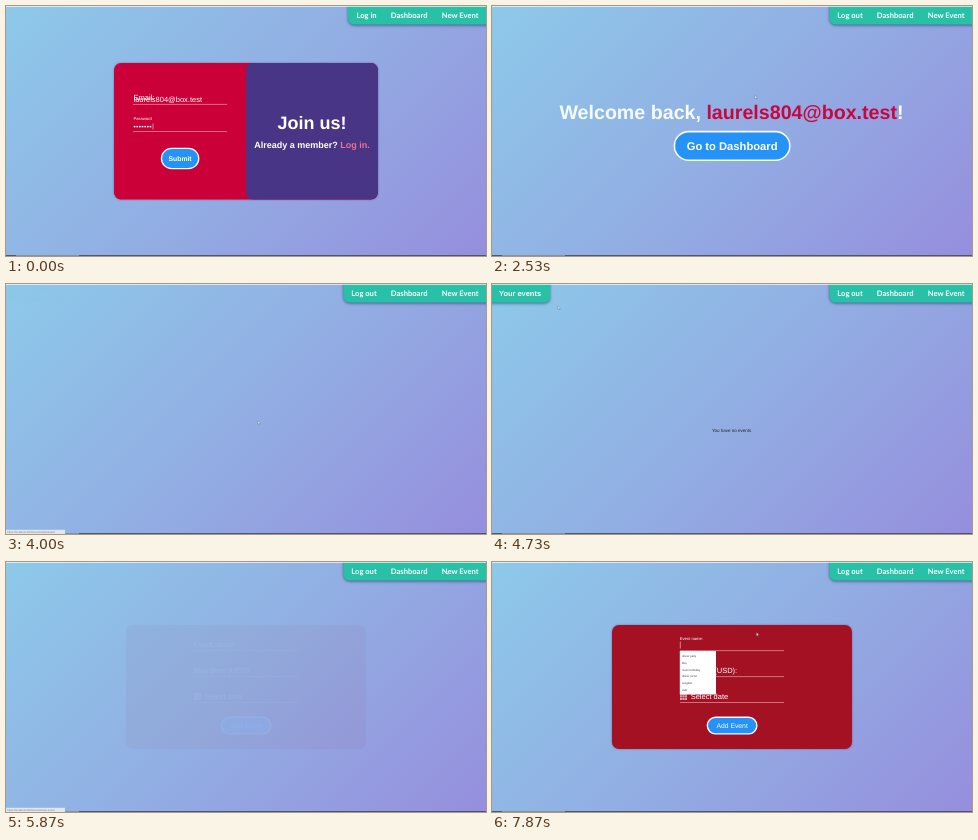
Animation of 480x250 px, one loop 8 s. Source, as an HTML page:

```html
<!DOCTYPE html>
<html lang="en">
<head>
<meta charset="utf-8">
<title>Event planner</title>
<style>
html, body { margin: 0; width: 100%; height: 100%; overflow: hidden; }
svg {
  display: block; width: 100vw; height: 100vh;
  background: linear-gradient(135deg, #8dc9e9 0%, #92ade3 52%, #968edd 100%);
  font-family: "Liberation Sans", Arial, sans-serif;
  text-rendering: geometricPrecision;
  fill: #fff;
}
.bold { font-weight: 700; }
.mid { text-anchor: middle; }
.nav { font: 700 7.6px Lato, sans-serif; }
.field { font-size: 7.5px; }
.small { font-size: 4.2px; }
.tab { fill: #28c0a7; filter: drop-shadow(0 1px 1.5px rgba(20, 40, 80, .6)); }
.card { filter: drop-shadow(0 .5px 1px rgba(40, 30, 90, .4)); }
.line { stroke: #fff; stroke-opacity: .6; stroke-width: .7; }
.caret { stroke: #fff; stroke-width: .5; }
</style>
</head>
<body>
<svg viewBox="0 0 480 250" preserveAspectRatio="none">
  <g id="login">
    <rect class="card" x="108" y="57" width="264" height="136.5" rx="7" fill="#cb0039"/>
    <rect x="240" y="57" width="132" height="136.5" rx="7" fill="#483586"/>
    <text class="field" x="127.5" y="93.7">Email:</text>
    <text class="field" x="127.5" y="95.5">laurels804@box.test</text>
    <path class="line" d="M127 98.4H221M127 125.5H221"/>
    <text class="small" x="127.5" y="114">Password</text>
    <g id="dots"></g>
    <path id="passCaret" class="caret" d="M147 117.5V123.5"/>
    <text class="bold mid" x="306" y="122.5" font-size="18">Join us!</text>
    <text class="bold mid" x="306" y="142" font-size="9">Already a member? <tspan fill="#f2718f">Log in.</tspan></text>
    <g id="submit"></g>
  </g>

  <g id="welcome">
    <text class="bold" x="67.4" y="113.2" font-size="19.65" fill="#f4fbfa">Welcome back, <tspan fill="#c9063f">laurels804@box.test</tspan>!</text>
    <g id="go"></g>
  </g>

  <g id="dashboard">
    <rect class="tab" x="-10" y="-10" width="68" height="28.4" rx="5"/>
    <text class="bold" x="7" y="12" font-size="7.45">Your events</text>
    <text x="220" y="147.6" font-size="4.5" fill="#20242e">You have no events</text>
  </g>

  <g id="create">
    <rect class="card" x="120" y="63" width="240" height="124" rx="7" fill="#a31122"/>
    <text id="nameLabel" x="187.7">Event name:</text>
    <text class="field" x="187.7" y="111">Max price (USD):</text>
    <path class="line" d="M188 88.6H292M188 114.6H292M188 140.5H292"/>
    <rect x="188" y="131" width="7" height="7" fill="#d9a9b0"/>
    <path d="M188 133H195M190.3 133V138M192.7 133V138M188 135.5H195" stroke="#a31122" stroke-width=".5"/>
    <text class="field" x="198.7" y="137">Select date</text>
    <g id="add"></g>
    <path id="nameCaret" class="caret" d="M188.3 79.5V86.5"/>
    <g id="list" font-size="2.7"><rect x="187.8" y="89" width="36.2" height="43.5"/></g>
  </g>

  <rect id="navBox" class="tab" y="-10" width="160" height="28.4" rx="6"/>
  <text id="logLabel" class="nav" y="12.2"></text>
  <text class="nav" x="384.8" y="12.2">Dashboard</text>
  <text class="nav" x="435.8" y="12.2">New Event</text>

  <rect width="480" height=".9" fill-opacity=".75"/>
  <rect y="249.1" width="480" height=".9" fill="#46505f"/>
  <rect x="10" y="249.1" width="63" height=".9" fill="#8c9aa5"/>
  <g id="status">
    <rect y="245.8" width="59" height="4.2" fill="#e3e7ec"/>
    <text id="link" x="1.2" y="248.7" font-size="2.7" fill="#737a85"></text>
  </g>
  <path id="cursor" d="M0 0V4L1 3.1L1.7 4.6L2.4 4.3L1.7 2.9H3Z" stroke="#39435a" stroke-width=".35"/>
</svg>
<script>
const LOOP = 8000, FPS = 15;
const $ = id => document.getElementById(id);

function add(parent, tag, attrs, text = '') {
  const node = document.createElementNS('http://www.w3.org/2000/svg', tag);
  for (const key in attrs) node.setAttribute(key, attrs[key]);
  node.textContent = text;
  return parent.appendChild(node);
}

// Builds a pill button and returns its hover layer.
function pill(id, label, x, y, w, h, size, weight, border) {
  const layer = (fill, ink, edge) => {
    const g = add($(id), 'g', {});
    const b = border / 2;
    add(g, 'rect', { x: x + b, y: y + b, width: w - border, height: h - border,
      rx: (h - border) / 2, fill, stroke: edge, 'stroke-width': border });
    add(g, 'text', { x: x + w / 2, y: y + h / 2 + size * .36, class: 'mid',
      'font-size': size, 'font-weight': weight, fill: ink }, label);
    return g;
  };
  layer('#2492f7', '#fff', '#f6fbfb');
  return layer('#f1faf3', '#2492f7', '#2492f7');
}

const submitHover = pill('submit', 'Submit', 154.8, 141.8, 38.6, 21.4, 6.8, 700, 1.3);
const goHover = pill('go', 'Go to Dashboard', 181.6, 124.8, 117, 30.2, 11.2, 700, 1.6);
const addHover = pill('add', 'Add Event', 214.6, 154.6, 51, 18, 6.8, 400, 1.4);

for (let i = 0; i < 7; i++) add($('dots'), 'circle', { cx: 128.6 + i * 2.65, cy: 120.6, r: .95 });
['dinner party', 'bbq', "mum's birthday", 'dinner picnic', 'songfest', 'cafe'].forEach((item, i) =>
  add($('list'), 'text', { x: 190, y: 95.2 + i * 6.75, fill: '#333' }, item));

// Pointer path: time, x, y
const path = [
  [60, 168, 155], [1370, 168, 155], [2200, 263, 89.5], [2800, 263, 89.5],
  [3070, 275, 98], [3330, 256, 134], [3470, 256, 134], [3730, 252, 137],
  [4060, 252, 137], [4730, 66, 22], [4860, 66, 22], [5600, 441, 10],
  [5930, 441, 10], [6540, 205, 84], [6660, 205, 84], [6900, 264.5, 70.5], [8000, 264.5, 70.5]
];
// Pages: start, end, fade-in length
const pages = {
  login: [0, 530, 0], welcome: [530, 4000, 600], dashboard: [4000, 5800, 550], create: [5800, LOOP, 720]
};

const clamp = v => Math.min(1, Math.max(0, v));
const ease = v => v * v * (3 - 2 * v);
const ramp = (t, from, to) => ease(clamp((t - from) / (to - from)));
const mix = (a, b, p) => a + (b - a) * p;
const show = (node, on) => node.setAttribute('opacity', +on);

function pointerAt(t) {
  const i = Math.max(1, path.findIndex(p => p[0] >= t));
  const [a, b] = [path[i - 1], path[i]];
  const p = ramp(t, a[0], b[0]);
  return [mix(a[1], b[1], p), mix(a[2], b[2], p)];
}

function draw(t) {
  for (const id in pages) {
    const [start, end, fade] = pages[id];
    const on = t >= start && t < end;
    show($(id), on ? (fade ? ramp(t, start - 20, start + fade) : 1) : 0);
  }

  const loggedIn = t >= 530;
  $('navBox').setAttribute('x', loggedIn ? 337.5 : 342);
  $('logLabel').setAttribute('x', loggedIn ? 345.3 : 350.5);
  $('logLabel').textContent = loggedIn ? 'Log out' : 'Log in';

  show($('passCaret'), t < 60);
  show(submitHover, ramp(t, 0, 130));
  show(goHover, ramp(t, 3100, 3330));
  show(addHover, 0);

  const overNav = t >= 5530 && t < 6000;
  show($('status'), (t >= 3190 && t < 4060) || overNav);
  $('link').textContent = overNav ? 'https://localhost:3000/events/new-event' : 'https://localhost:3000/events/dashboard';

  const focus = ramp(t, 6600, 6800);
  $('nameLabel').setAttribute('y', mix(85.3, 77.6, focus));
  $('nameLabel').setAttribute('font-size', mix(7.5, 4.15, focus));
  show($('nameCaret'), t >= 6660 && (t < 7190 || t >= 7790));
  show($('list'), t >= 6730);

  show($('cursor'), t >= 60);
  $('cursor').setAttribute('transform', `translate(${pointerAt(t)}) scale(.8)`);
}

const begin = performance.now();
function tick(now) {
  const t = Math.max(0, now - begin) % LOOP;
  draw(Math.min(LOOP - 1, Math.floor((t + 4) * FPS / 1000) * 1000 / FPS));
  requestAnimationFrame(tick);
}
draw(0);
requestAnimationFrame(tick);
</script>
</body>
</html>
```
